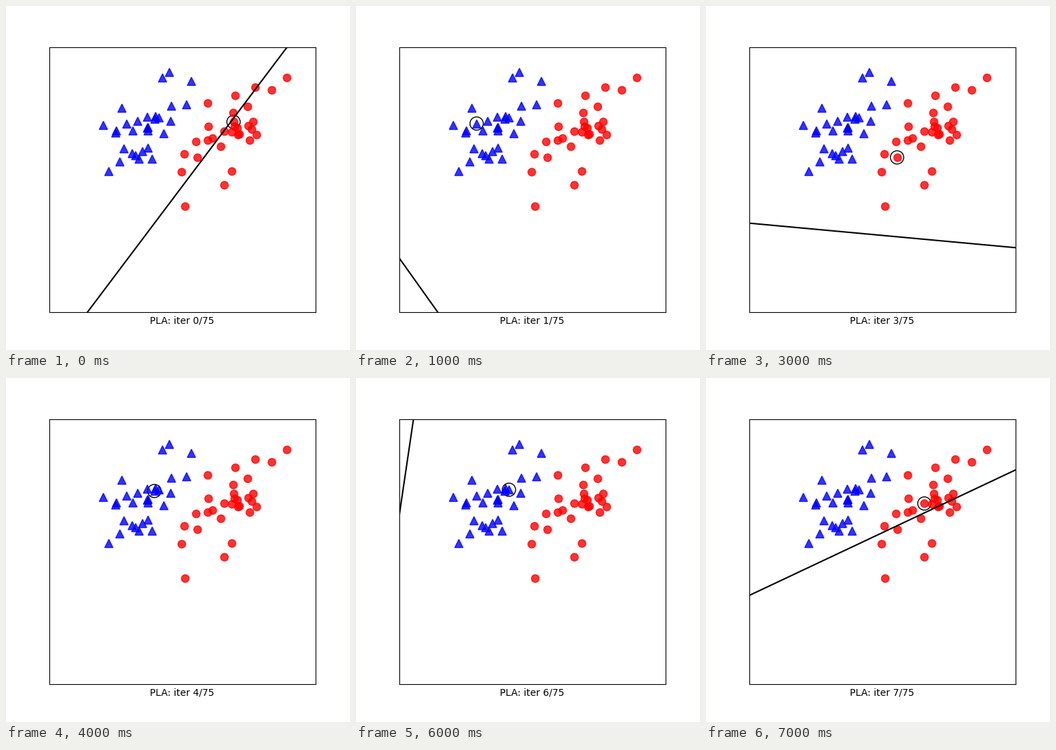
Animation of 500 by 500 pixels, one loop 8000 ms. Source, as a matplotlib script:

```python
import numpy as np
import matplotlib.pyplot as plt
from matplotlib.animation import FuncAnimation

N = 30
TOTAL = 75

# Two Gaussian classes and a random starting boundary
np.random.seed(2)
cov = [[0.3, 0.2], [0.2, 0.3]]
blue = np.random.multivariate_normal([2, 2], cov, N)
red = np.random.multivariate_normal([4, 2], cov, N)
start = np.random.randn(3)

# Rough places of the misclassified points, in the order they are visited
visits = [
    (red, (4.16, 2.31)), (blue, (1.74, 2.27)),
    (blue, (2.10, 1.65)), (red, (3.34, 1.51)),
    (blue, (2.39, 2.38)), (red, (3.04, 1.58)),
    (blue, (2.47, 2.41)), (red, (3.94, 2.10)),
]


def nearest(points, place):
    return points[np.argmin(np.hypot(*(points - place).T))]


def perceptron(w):
    """List the weights and the misclassified point of every step."""
    steps = []
    for points, place in visits:
        point = nearest(points, place)
        steps.append((w, point))
        sign = 1 if points is blue else -1
        w = w + sign * np.array([1, *point])
    return steps


steps = perceptron(start)

fig, ax = plt.subplots(figsize=(5, 5), dpi=100)
fig.subplots_adjust(left=0.125, right=0.9, bottom=0.11, top=0.88)
ax.axis([0, 6, -2, 4])
ax.set_xticks([])
ax.set_yticks([])

ax.plot(*blue.T, "b^", markersize=8, alpha=0.8)
ax.plot(*red.T, "ro", markersize=8, alpha=0.8)
line, = ax.plot([], [], "k-", linewidth=1.5)
ring = ax.add_patch(plt.Circle((0, 0), 0.15, color="k", fill=False))
label = ax.set_xlabel("", fontsize=10)


def draw(i):
    (w0, w1, w2), point = steps[i]
    x = np.array([-100, 100])
    line.set_data(x, -(w0 + w1 * x) / w2)
    ring.center = point
    label.set_text(f"PLA: iter {i}/{TOTAL}")
    return line, ring, label


anim = FuncAnimation(fig, draw, frames=len(steps), interval=1000, repeat=True)
plt.show()
```
